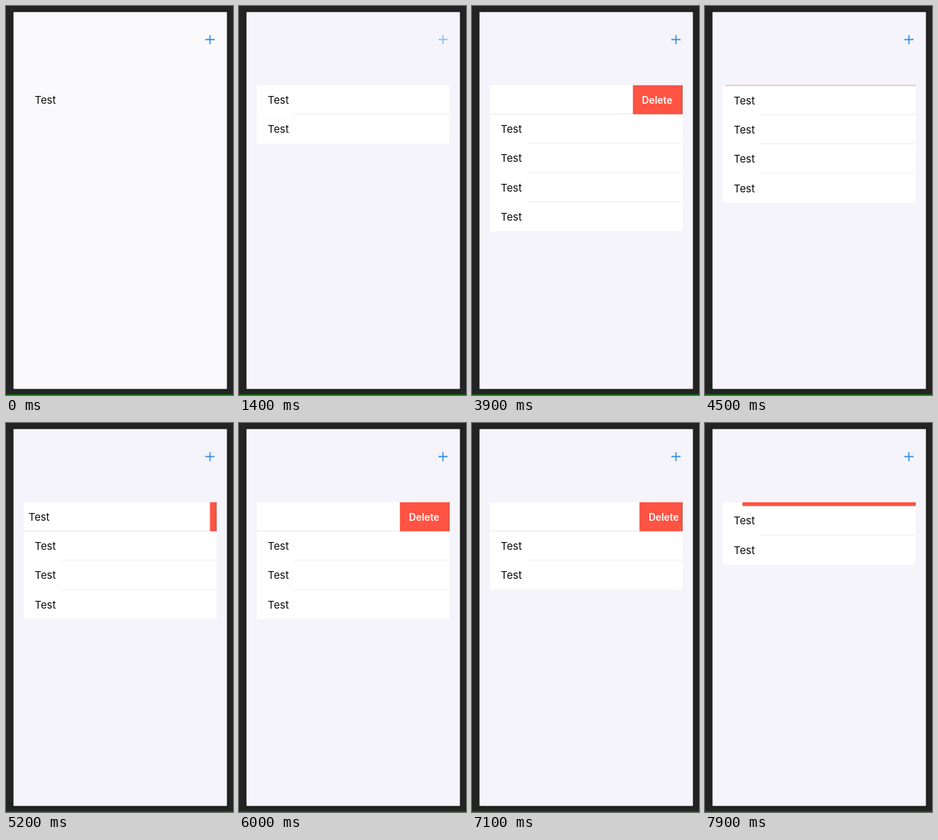
Recreate the animation shown at these times as an HTML page. Size 320 by 549 pixels, loop 8000 ms.

```html
<!DOCTYPE html>
<html lang="en">
<head>
<meta charset="utf-8">
<title>Swipe to delete</title>
<style>
  html, body { margin: 0; width: 100%; height: 100%; overflow: hidden; background: #232323; }
  svg { display: block; width: 320px; height: 549px; }
  text { font: 14.8px Inter, Roboto, sans-serif; fill: #0c0c10; }
  .delete text { font-size: 13.8px; font-weight: 600; fill: #fff; }
</style>
</head>
<body>
<svg viewBox="0 0 320 549">
  <clipPath id="card"><rect x="25" y="111.6" width="272" height="400"/></clipPath>
  <rect width="320" height="549" fill="#232323"/>
  <rect y="547.5" width="320" height="1.5" fill="#0b5c0b"/>
  <rect x="10" y="8" width="302" height="533" fill="#f4f4fa"/>
  <rect id="veil" x="10" y="8" width="302" height="533" fill="#fafafd"/>
  <rect x="10" y="8" width="302" height="533" fill="none" stroke="#111"/>
  <path id="plus" d="M281 47.4h13M287.5 41v13" stroke="#2f8ce4" stroke-width="1.6" fill="none"/>
  <g id="list" clip-path="url(#card)"></g>
</svg>
<script>
const LOOP = 8000, TOP = 111.6, PITCH = 41.3, LEFT = 25, RIGHT = 296.4, BUTTON = 69.6;
const inserts = [1180, 1460, 1740, 2020];
const removals = [
  { swipe: 3150, span: 550, tap: 4220 },
  { swipe: 5050, span: 650, tap: 6130 },
  { swipe: 6720, span: 500, tap: 7725 }
];

const $ = id => document.getElementById(id);
const list = $('list'), veil = $('veil'), plus = $('plus');
const ramp = (t, start, span) => Math.min(1, Math.max(0, (t - start) / span));
const easeInOut = u => (1 - Math.cos(Math.PI * u)) / 2;
const easeOut = u => 1 - (1 - u) ** 4;

function add(parent, tag, attrs, text = '') {
  const el = document.createElementNS('http://www.w3.org/2000/svg', tag);
  set(el, attrs);
  el.textContent = text;
  return parent.appendChild(el);
}
function set(el, attrs) {
  for (const key in attrs) el.setAttribute(key, attrs[key]);
}

let button, edge;
const rows = Array.from({ length: 5 }, (_, i) => {
  const group = add(list, 'g', {});
  const fill = add(group, 'rect', { x: LEFT, width: 272, height: PITCH, fill: '#fff' });
  const label = add(group, 'text', { x: 40.6, y: 26.2 }, 'Test');
  const line = add(group, 'rect', { y: PITCH - 0.8, height: 1, fill: '#e4e4e8' });
  if (!i) {
    button = add(group, 'g', { class: 'delete' });
    add(button, 'rect', { width: 272, height: PITCH, fill: '#ff5343' });
    add(button, 'text', { x: 12.8, y: 26 }, 'Delete');
    edge = add(group, 'rect', { x: RIGHT - 0.6, width: 0.8, height: PITCH, fill: '#8c6a68' });
  }
  return { group, fill, label, line };
});

function draw(t) {
  const fade = ramp(t, 80, 240);
  veil.setAttribute('opacity', 1 - fade);

  // Each tap dims the plus briefly
  const press = Math.max(...inserts.map(s => 1 - Math.min(1, Math.abs(t - s + 20) / 110)));
  plus.setAttribute('opacity', 1 - 0.7 * press);

  // The first row is always the one being swiped away
  const done = removals.filter(r => t >= r.swipe).length;
  const now = removals[done - 1];
  const open = now ? easeInOut(ramp(t, now.swipe, now.span)) : 0;
  const gone = now ? easeOut(ramp(t, now.tap, 450)) : 0;
  const count = done ? 6 - done : 5;
  const shown = i => i >= count ? 0 : i ? easeOut(ramp(t, inserts[i - 1], 320)) : 1;

  rows.forEach(({ group, fill, line }, i) => {
    const lineLeft = !i && open ? LEFT : 78;
    set(group, {
      transform: `translate(0 ${TOP + PITCH * (i - (i ? gone : 0))})`,
      opacity: shown(i)
    });
    set(line, {
      x: lineLeft,
      width: RIGHT - lineLeft,
      opacity: (i < 4 ? shown(i + 1) : 0) * (i ? 1 : 1 - gone)
    });
    if (!i) fill.setAttribute('opacity', fade);
  });

  const shift = BUTTON * open + (RIGHT - LEFT - BUTTON) * gone;
  const visibility = open && gone < 1 ? 'visible' : 'hidden';
  rows[0].label.setAttribute('x', 40.6 - shift);
  set(button, { transform: `translate(${RIGHT - shift} 0)`, visibility });
  set(edge, { visibility });
}

const start = performance.now();
function tick() {
  draw((performance.now() - start) % LOOP);
  requestAnimationFrame(tick);
}
tick();
</script>
</body>
</html>
```
